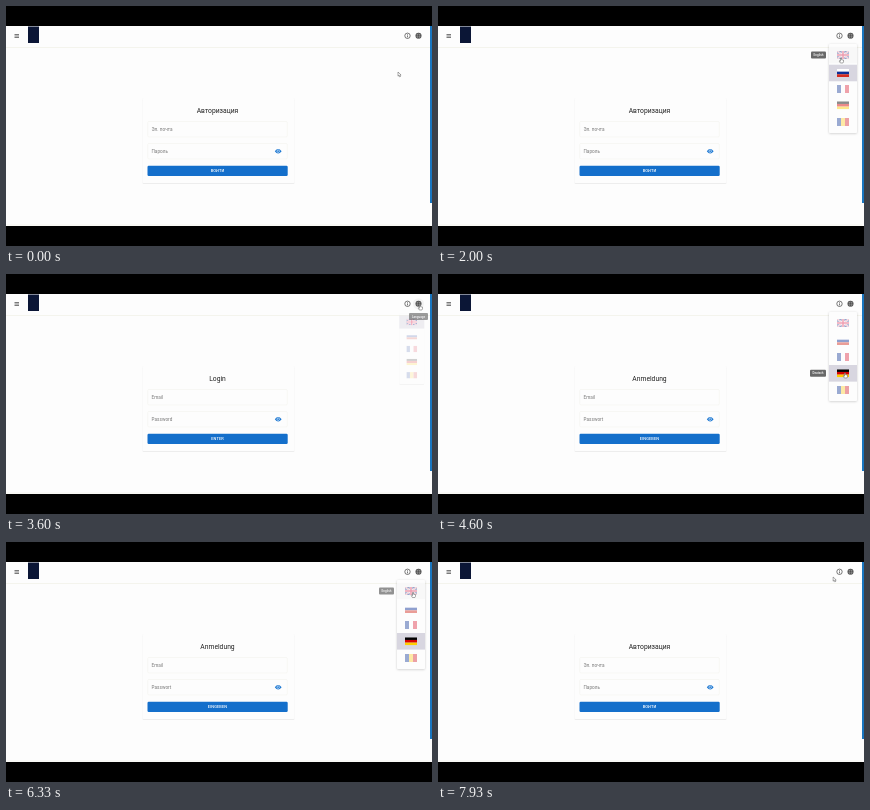
Animation of 426x240 px, one loop 8000 ms. Source, as an HTML page:

```html
<!DOCTYPE html>
<html lang="en">
<head>
<meta charset="utf-8">
<title>Login language switch</title>
<style>
  html, body { margin: 0; width: 100%; height: 100%; overflow: hidden; background: #000; }
  svg { display: block; width: 100vw; height: 100vh; font-family: Roboto, Arial, sans-serif; }
  .label { font-size: 4.65px; fill: #777; letter-spacing: .00938em; }
  .middle { text-anchor: middle; }
  .tip { font-size: 3px; font-weight: 500; fill: #fff; text-anchor: middle; }
  .line { fill: none; stroke: #333; stroke-width: .65; }
  .field { fill: none; stroke: #f3f3ee; stroke-width: .6; }
</style>
</head>
<body>
<svg viewBox="0 0 426 240">
  <defs>
    <filter id="shadow" x="-20%" y="-20%" width="140%" height="140%">
      <feDropShadow dx="0" dy=".6" stdDeviation=".8" flood-opacity=".2"/>
    </filter>
    <filter id="soft"><feDropShadow dx="0" dy=".4" stdDeviation=".5" flood-opacity=".16"/></filter>
  </defs>
  <rect width="426" height="240"/>
  <rect y="20" width="426" height="200" fill="#fdfdfd"/>
  <path d="M0 41.5H424M0 219H424" stroke="#f3f3ea" stroke-width=".8"/>
  <rect x="424" y="20" width="2" height="177" fill="#1976c0"/>

  <path class="line" d="M8.5 28.5h4.5M8.5 30h4.5M8.5 31.5h4.5"/>
  <rect x="22" y="20.5" width="11" height="16.5" fill="#0b1636"/>
  <circle class="line" cx="401.5" cy="29.8" r="2.7"/>
  <path class="line" d="M401.5 29.4v2M401.5 28.1v.7"/>
  <circle id="hover" cx="412.5" cy="29.8" r="5.6" fill="#000" opacity="0"/>
  <g id="globe">
    <circle cx="412.5" cy="29.8" r="3" fill="#444"/>
    <path d="M409.7 28.8h5.6M409.7 30.8h5.6" stroke="#bbb" stroke-width=".4"/>
    <ellipse cx="412.5" cy="29.8" rx="1.2" ry="2.7" fill="none" stroke="#bbb" stroke-width=".4"/>
  </g>

  <rect x="136.5" y="92" width="152" height="85" rx="1.2" fill="#fdfdfd" filter="url(#soft)"/>
  <text id="title" class="middle" x="211.5" y="106.5" font-size="6.75" fill="#222"></text>
  <rect class="field" x="141.7" y="115.5" width="139.6" height="15.5" rx="1.2"/>
  <rect class="field" x="141.7" y="137.5" width="139.6" height="15.5" rx="1.2"/>
  <text id="email" class="label" x="145.5" y="124.8"></text>
  <text id="password" class="label" x="145.5" y="146.8"></text>
  <path d="M268.8 145.2q3.4-4.6 6.8 0q-3.4 4.6-6.8 0z" fill="#1976d2"/>
  <circle cx="272.2" cy="145.2" r="1.25" fill="#1976d2" stroke="#fff" stroke-width=".6"/>
  <rect x="141.5" y="159.8" width="140.2" height="10.2" rx="1.2" fill="#146fcb"/>
  <text id="submit" class="middle" x="211.5" y="166.3" font-size="3.95" font-weight="500" letter-spacing=".1" fill="#fff"></text>

  <g id="menu">
    <rect x="391" y="38" width="28" height="89" rx="1.3" fill="#fdfdfd" filter="url(#shadow)"/>
    <rect id="over" x="391" width="28" height="16.6" fill="#f8f8f8"/>
    <rect id="selected" x="391" width="28" height="16.6" fill="#d8d6e0"/>
    <g id="flags"></g>
  </g>
  <g id="tooltip">
    <rect id="tipBox" height="7" rx="1" fill="#616161"/>
    <text id="tipText" class="tip"></text>
  </g>
  <g id="cursor" stroke="#444" stroke-width=".45" fill="#fff" stroke-linejoin="round">
    <path id="arrow" d="M0 0v4.2l1-.9.7 1.6.8-.4-.7-1.5h1.3z"/>
    <path id="hand" d="M-.5 0q.5-.5 1 0v1.7l2 .4v1.7l-.6 1.2h-2.5l-1.3-2 .5-.4.9.6z"/>
  </g>
</svg>
<script>
const LOOP = 8000;
const $ = id => document.getElementById(id);
const rowY = [49, 67, 83, 99.3, 116];

const texts = {
  ru: { title: 'Авторизация', email: 'Эл. почта', password: 'Пароль', submit: 'ВОЙТИ' },
  en: { title: 'Login', email: 'Email', password: 'Password', submit: 'ENTER' },
  de: { title: 'Anmeldung', email: 'Email', password: 'Passwort', submit: 'EINGEBEN' }
};
const rowOf = { en: 0, ru: 1, de: 3 };
const languages = [[0, 'ru'], [2330, 'en'], [4530, 'de'], [7000, 'ru']];

// Opening and closing times of the menu
const openings = [[1000, 2370], [3470, 4640], [5500, 7040]];

// Tooltips: start, end, text, box width, menu row (-1 is the globe)
const tips = [
  [690, 1080, 'Выбрать язык', 23, -1],
  [1700, 2400, 'English', 15, 0],
  [3480, 3850, 'Language', 19, -1],
  [4300, 4700, 'Deutsch', 16, 3],
  [5250, 5650, 'Sprache', 17, -1],
  [6200, 6620, 'English', 15, 0],
  [6750, 7100, 'Русский', 16, 1]
];

// Cursor: time, x, y
const path = [
  [0, 392, 66], [200, 392.5, 65], [680, 411, 31], [1250, 411, 31],
  [1700, 403, 52], [2450, 403, 52], [3150, 414, 31], [3700, 414, 31],
  [4250, 407, 99], [4700, 407, 99], [5200, 413, 31], [5700, 413, 31],
  [6200, 407, 50.5], [6400, 407, 50.5], [6700, 405, 66], [7150, 405, 66],
  [7800, 395.5, 35], [8000, 395, 35]
];

const clamp = v => Math.max(0, Math.min(1, v));
const ease = v => (v = clamp(v), v * v * (3 - 2 * v));
const mix = (a, b, k) => a + (b - a) * k;
const pulse = (t, [start, end], rise, fall) =>
  ease((t - start) / rise) * (1 - ease((t - end) / fall));

function set(id, attributes) {
  for (const name in attributes) $(id).setAttribute(name, attributes[name]);
}

function buildFlags() {
  const stripes = (colors, upright) => colors.map((color, i) => upright
    ? `<rect x="${-6 + i * 4}" y="-4" width="4" height="8" fill="${color}"/>`
    : `<rect x="-6" y="${-4 + i * 8 / 3}" width="12" height="2.67" fill="${color}"/>`).join('');
  const cross = (d, color, width) => `<path d="${d}" stroke="${color}" stroke-width="${width}"/>`;
  const diagonal = 'M-6-4L6 4M-6 4L6-4', upright = 'M0-4V4M-6 0H6';
  const union = '<rect x="-6" y="-4" width="12" height="8" fill="#2c4090"/>' +
    cross(diagonal, '#fff', 1.6) + cross(diagonal, '#e0305a', .6) +
    cross(upright, '#fff', 2.6) + cross(upright, '#e0305a', 1.5);
  const designs = [
    union,
    stripes(['#fff', '#0c2f96', '#d52b1e']),
    stripes(['#2346a0', '#fff', '#e0354a'], true),
    stripes(['#000', '#d80000', '#ffce00']),
    stripes(['#2346a0', '#ffd23c', '#d8303c'], true)
  ];
  $('flags').innerHTML = designs.map((design, i) =>
    `<svg x="399" y="${rowY[i] - 4}" width="12" height="8" viewBox="-6 -4 12 8">${design}</svg>`).join('');
}

function cursorAt(t) {
  const i = path.findIndex(point => point[0] > t);
  const [t0, x0, y0] = path[i - 1], [t1, x1, y1] = path[i];
  const k = ease((t - t0) / (t1 - t0));
  return [mix(x0, x1, k), mix(y0, y1, k)];
}

function drawMenu(t, language, x, y) {
  const opening = openings.find(span => t >= span[0] && t < span[1] + 220);
  $('menu').style.display = opening ? '' : 'none';
  if (!opening) return false;
  const grow = ease((t - opening[0]) / 240);
  const scaleX = mix(.75, 1, grow);
  set('menu', {
    opacity: pulse(t, opening, 310, 200),
    transform: `translate(412 44) scale(${scaleX} ${scaleX ** 2}) translate(-412 -44)`
  });
  const row = rowOf[language];
  const over = x > 391 && x < 419 ? rowY.findIndex(c => Math.abs(y + 1.5 - c) < 8.2) : -1;
  set('selected', { y: rowY[row] - 8.3 });
  set('over', { y: rowY[Math.max(over, 0)] - 8.3, opacity: over < 0 ? 0 : 1 });
  [...$('flags').children].forEach((flag, i) => flag.setAttribute('opacity', i === row ? 1 : .45));
  return over >= 0;
}

function drawTooltip(t) {
  const tip = tips.find(item => t >= item[0] && t < item[1] + 160);
  $('tooltip').style.display = tip ? '' : 'none';
  if (!tip) return;
  const [, , text, width, row] = tip;
  const x = row < 0 ? 412.5 - width / 2 : 388 - width;
  const y = row < 0 ? 39 : rowY[row] - 3.5;
  set('tooltip', { opacity: .95 * pulse(t, tip, 200, 150) });
  set('tipBox', { x, y, width });
  set('tipText', { x: x + width / 2, y: y + 4.6 });
  $('tipText').textContent = text;
}

function draw(t) {
  const language = languages.filter(item => item[0] <= t).pop()[1];
  for (const id in texts[language]) $(id).textContent = texts[language][id];

  const [x, y] = cursorAt(t);
  const onGlobe = Math.hypot(x - 412.5, y - 29.8) < 5.6;
  const onRow = drawMenu(t, language, x, y);
  drawTooltip(t);
  set('hover', { opacity: onGlobe ? .04 : 0 });
  set('cursor', { transform: `translate(${x} ${y})` });
  $('hand').style.display = onGlobe || onRow ? '' : 'none';
  $('arrow').style.display = onGlobe || onRow ? 'none' : '';
}

function frame() {
  draw(performance.now() % LOOP);
  requestAnimationFrame(frame);
}

buildFlags();
frame();
</script>
</body>
</html>
```
